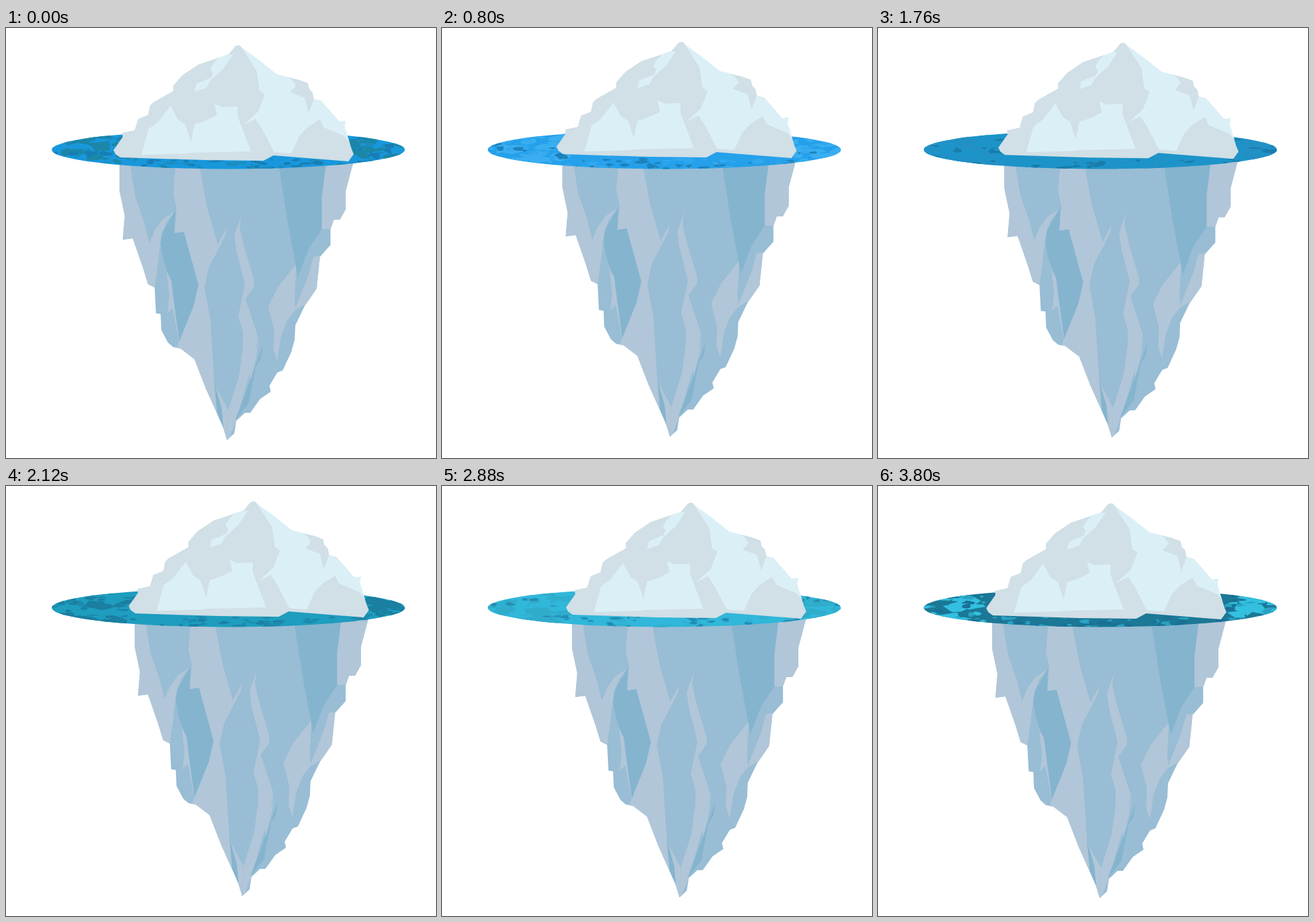
An HTML page that plays this animation: 648 by 648 pixels, repeating every 3.84 s.

```html
<!DOCTYPE html>
<html lang="en">
<head>
<meta charset="utf-8">
<title>Iceberg</title>
<style>
html, body { margin: 0; width: 100%; height: 100%; overflow: hidden; background: #fff; }
svg { display: block; width: 100vw; height: 100vh; }
</style>
</head>
<body>
<svg viewBox="0 0 648 648">
  <defs><clipPath id="pool"><ellipse cx="335" cy="183.5" rx="266" ry="28.9"/></clipPath></defs>
  <g id="below"></g>
  <g id="sea" clip-path="url(#pool)"><rect id="base" x="60" y="150" width="550" height="70"/></g>
  <g id="above"></g>
</svg>
<script>
const LOOP = 3840, STEP = 40, PATCHES = 150;
const LIGHT = '#b1c6d8', MID = '#98bdd4', DARK = '#85b4cf';
const SNOW = '#daf0f6', SHADE = '#d1dfe6';
const $ = id => document.getElementById(id);

function add(parent, tag, attrs = {}) {
  const el = document.createElementNS('http://www.w3.org/2000/svg', tag);
  for (const k in attrs) el.setAttribute(k, attrs[k]);
  return parent.appendChild(el);
}

// Fills an outline and returns a painter whose facets are cut off at its edge
function block(id, fill, points) {
  const clip = add(document.querySelector('defs'), 'clipPath', { id: id + 'Edge' });
  add(clip, 'polygon', { points });
  add($(id), 'polygon', { points, fill });
  const group = add($(id), 'g', { 'clip-path': `url(#${id}Edge)` });
  return (fill, points) => add(group, 'polygon', { points, fill });
}

// Submerged ice
const deep = block('below', MID, '171,200 171,245 179,283 176,319 191,317 206,360 214,386 224,391 226,430 233,431 234,455 244,474 252,481 263,483 284,499 301,543 327,601 333,621 344,611 347,592 360,580 368,580 383,559 399,548 397,539 409,519 417,516 430,488 435,470 436,448 450,419 468,393 473,345 489,327 489,303 494,289 503,289 512,273 512,245 524,200');
// left flank
deep(LIGHT, '160,200 186,200 195,255 208,292 216,324 224,305 236,288 254,277 242,292 234,312 229,355 224,392 160,392');
deep(DARK, '255,275 254,309 268,307 290,387 283,418 263,484 255,425 250,385 237,350 233,325 236,308');
deep(LIGHT, '242,368 249,380 251,400 262,479 251,422 243,430 246,405');
// long ridge, then the tip with the hollow in it
deep(LIGHT, '256,200 290,200 303,270 319,326 332,302 331,312 306,360 299,391 308,440 314,537 335,576 333,621 250,500 283,418 290,387 268,307 254,309 257,272 252,250');
deep(LIGHT, '355,281 352,300 359,330 374,380 374,390 361,408 380,466 373,500 347,592 333,625 335,576 351,525 357,480 357,458 350,435 360,386 347,335 344,312');
deep(DARK, '314,535 325,573 328,605 318,580');
// right flank
deep(DARK, '387,478 384,498 376,511 366,565 345,592 369,528');
deep(LIGHT, '381,468 378,492 369,530 367,520');
deep(LIGHT, '438,355 410,390 395,420 404,455 403,485 409,502 414,466 424,440 436,425 480,400 473,343 461,345');
deep(MID, '438,345 466,335 456,372 436,422 435,405');
deep(DARK, '410,200 483,200 476,255 476,303 456,333 440,375 424,290');
deep(LIGHT, '483,200 530,200 530,303 476,303 476,255');

// Ice above the waterline
const peak = block('above', SHADE, '352,26 357,31 383,50 408,70 441,78 455,83 457,92 462,97 464,107 475,110 490,127 502,141 512,140 510,148 521,183 524,190 516,201 403,192 388,200 300,199 172,195 165,190 162,184 176,164 175,158 194,154 199,137 214,131 217,117 222,112 252,95 252,87 266,71 290,55 335,40 346,27');
peak(SNOW, '342,40 327,62 308,79 302,90 284,96 287,84 309,75 312,68 308,62 313,53 325,41');
// sunlit right side
peak(SNOW, '356,31 383,45 424,74 431,78 437,87 428,97 450,105 456,128 464,107 500,120 520,140 518,173 510,163 479,150 473,138 454,150 442,163 430,189 404,187 386,152 376,137 358,146 380,126 390,100 382,95 378,65');
// lower snowfields
peak(SNOW, '314,114 325,119 349,118 349,133 369,186 277,188 279,170 284,145 302,139 318,131');
peak(SNOW, '248,117 259,138 270,145 279,172 277,189 204,191 215,152 229,142');

const mix = (a, b, k) => a + (b - a) * k;
function blend(p, q, k) {
  return p.map((v, i) => Math.round(mix(v, q[i], k)));
}
function rgb(hex) {
  return [0, 2, 4].map(i => parseInt(hex.substr(i, 2), 16));
}
function rand(n) {
  const s = Math.sin(n * 127.1 + 11.7) * 43758.5453;
  return s - Math.floor(s);
}

// The berg jumps up, floats right while sinking, then slides back
function drift(t) {
  if (t < 480) return [8 * t / 480, -5 * t / 480];
  if (t < 2720) {
    const k = (t - 480) / 2240;
    return [mix(8, 29, k ** 1.1), mix(-5, -1.2, k * k)];
  }
  const k = (LOOP - t) / 1120;
  return [29 * k, -1.2 * k];
}

// Water: time, middle colour, colour of both ends
const TINTS = [
  [0, '1897dc', '1c86a8'], [800, '25a0ea', '3aaef0'], [1400, '1a8ad2', '2aa0ea'],
  [2120, '1e9dbf', '1a7fa0'], [2480, '27a8c9', '1f92b4'], [3240, '38c5ea', '40c4e0'],
  [3800, '1b7896', '33c0e0']
];
const ABYSS = rgb('176a94');

function tones(t) {
  let i = 0;
  while (i < TINTS.length - 2 && t >= TINTS[i + 1][0]) i++;
  const [a, b] = [TINTS[i], TINTS[i + 1]];
  const k = Math.min(1, (t - a[0]) / (b[0] - a[0]));
  const [mid, end] = [1, 2].map(n => blend(rgb(a[n]), rgb(b[n]), k));
  return [mid, end, blend(mid, ABYSS, 0.55), blend(mid, end, 0.6)].map(c => `rgb(${c})`);
}

// A patch swells, drifts and fades away, then starts again elsewhere
function patchPoints(i, t) {
  const life = t / 1280 + rand(i), age = life % 1;
  const seed = i * 31 + Math.floor(life) * 977;
  const size = Math.sqrt(Math.sin(Math.PI * age));
  const front = i % 3 === 0, broad = i < PATCHES / 2 && !front;
  const x0 = front ? mix(185, 545, rand(seed))
    : i % 3 === 1 ? mix(70, 195, rand(seed)) : mix(520, 602, rand(seed));
  const x = x0 + (0.5 - age) * 8;
  const y = front ? mix(197, 213, rand(seed + 1)) : mix(161, 207, rand(seed + 1));
  const w = mix(5, 13, rand(seed + 2)) * size * (broad ? 1.8 : 1);
  const h = mix(1.8, 4.2, rand(seed + 3)) * size * (broad ? 1.9 : 1);
  let points = '';
  for (let j = 0; j < 7; j++) {
    const a = j * Math.PI * 2 / 7, r = mix(0.45, 1.3, rand(seed + 4 + j));
    points += `${(x + Math.cos(a) * w * r).toFixed(1)},${(y + Math.sin(a) * h * r).toFixed(1)} `;
  }
  return points;
}

const patches = Array.from({ length: PATCHES }, () => add($('sea'), 'polygon'));

function draw(t) {
  const move = `translate(${drift(t)})`;
  $('below').setAttribute('transform', move);
  $('above').setAttribute('transform', move);
  const fills = tones(t);
  $('base').setAttribute('fill', fills[0]);
  patches.forEach((el, i) => {
    const tone = i < PATCHES / 2 && i % 3 ? 1 : 2 + i % 2;
    el.setAttribute('fill', fills[tone]);
    el.setAttribute('points', patchPoints(i, t));
  });
}

const start = performance.now();
function tick() {
  const t = (performance.now() - start) % LOOP;
  draw(Math.floor(t / STEP) * STEP);
  requestAnimationFrame(tick);
}
tick();
</script>
</body>
</html>
```
